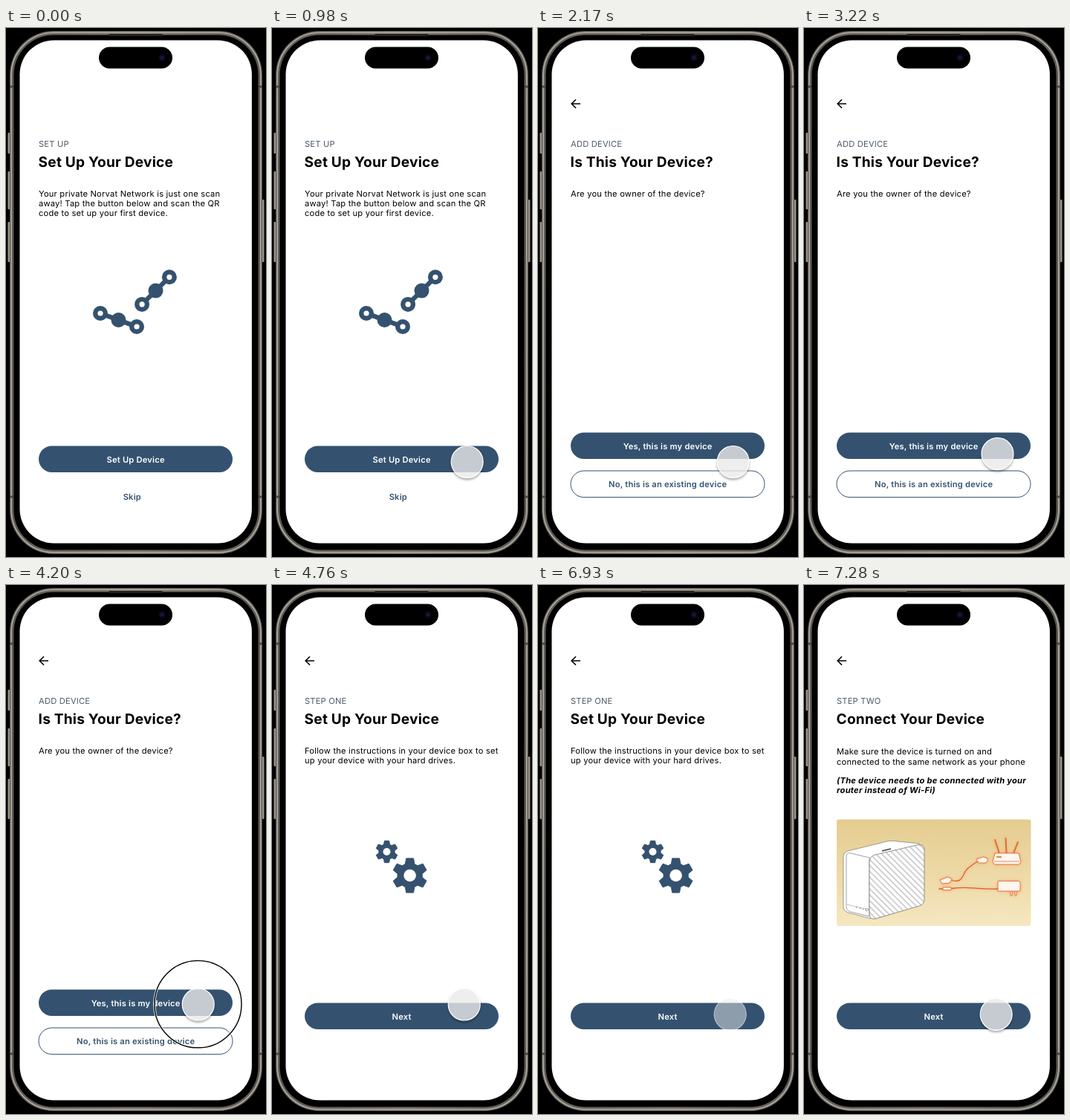
Write an HTML page that moves like this. It is 350 px wide and 712 px high and loops after 8000 ms.

```html
<!DOCTYPE html>
<html lang="en">
<head>
<meta charset="utf-8">
<title>Device setup</title>
<style>
  html, body { margin: 0; width: 100%; height: 100%; overflow: hidden; background: #000; }
  svg { display: block; width: 350px; height: 712px; }
  text {
    font: 400 11.15px Inter, sans-serif; font-optical-sizing: none; text-rendering: geometricPrecision;
    letter-spacing: .21px; fill: #000; white-space: pre;
  }
  .label { fill: #4b5967; }
  .title { font-size: 19.1px; font-weight: 700; }
  .button { font-weight: 600; text-anchor: middle; fill: #fff; }
  .plain { fill: #34526f; }
  .note { font-weight: 700; font-style: italic; letter-spacing: .26px; }
  .blue { fill: #34526f; }
  .link { stroke: #34526f; stroke-width: 6.2; }
  .sketch { fill: #fff; stroke: #777; stroke-width: .7; stroke-linejoin: round; }
  .wire { fill: none; stroke: #d0622f; stroke-width: 1.3; stroke-linecap: round; }
  .antenna { fill: none; stroke: #d9703c; stroke-width: 2; stroke-linecap: round; }
  .part { fill: #fff6ee; stroke: #d9703c; stroke-width: .9; stroke-linejoin: round; }
</style>
</head>
<body>
<svg viewBox="0 0 350 712" xmlns="http://www.w3.org/2000/svg">
  <defs>
    <clipPath id="screen"><rect x="18.5" y="16.4" width="312.4" height="677" rx="46"/></clipPath>
    <linearGradient id="metal" x2="1" y2="0">
      <stop offset="0" stop-color="#5d5a54"/><stop offset=".5" stop-color="#77736b"/><stop offset="1" stop-color="#5d5a54"/>
    </linearGradient>
    <linearGradient id="sand" x2="0" y2="1">
      <stop offset="0" stop-color="#e5cc90"/><stop offset=".5" stop-color="#edd9a6"/><stop offset="1" stop-color="#f5e7c1"/>
    </linearGradient>
    <pattern id="hatch" width="5.6" height="5.6" patternUnits="userSpaceOnUse" patternTransform="rotate(45)">
      <rect width="5.6" height="5.6" fill="#fff"/><path d="M0 2.8H5.6" stroke="#8c8c8c" stroke-width=".8"/>
    </pattern>
    <filter id="glow" x="-30%" y="-30%" width="160%" height="160%">
      <feDropShadow dx="0" dy="0" stdDeviation="2.2" flood-color="#ff8a4a" flood-opacity=".75"/>
    </filter>
    <filter id="shade" x="-30%" y="-30%" width="160%" height="160%">
      <feGaussianBlur stdDeviation="1.8"/>
    </filter>
    <mask id="outside">
      <rect x="-40" y="-40" width="80" height="80" fill="#fff"/><circle r="21.5"/>
    </mask>
  </defs>

  <!-- phone -->
  <g fill="#989287">
    <rect x="2.5" y="141" width="4" height="28" rx="1"/>
    <rect x="2.5" y="193" width="4" height="51" rx="1"/>
    <rect x="2.5" y="261" width="4" height="54" rx="1"/>
    <rect x="343.5" y="231" width="4" height="84" rx="1"/>
  </g>
  <rect x="5" y="4" width="340" height="704" rx="59" fill="url(#metal)"/>
  <rect x="7.2" y="6.2" width="335.6" height="699.6" rx="57" fill="none" stroke="#b1ada3" stroke-width="1.6"/>
  <path d="M5 79h6M339 79h6M5 631h6M339 631h6" stroke="#4a4742" stroke-width="3"/>
  <rect x="10.5" y="9.5" width="329" height="693" rx="53.5"/>
  <rect x="138" y="8" width="73" height="3" rx="1.5" fill="#24221f"/>
  <rect x="18.5" y="16.4" width="312.4" height="677" rx="46" fill="#fff"/>

  <g id="pages" clip-path="url(#screen)"></g>

  <rect x="125" y="25.5" width="99" height="29" rx="14.5"/>
  <circle cx="210" cy="40" r="4.6" fill="#0a0c1c"/>
  <circle cx="210" cy="40" r="2.2" fill="#15194a"/>

  <g id="ring" fill="none">
    <circle r="58.6" stroke="#fff" stroke-width="3.4" stroke-opacity=".8"/>
    <circle r="58.6" stroke="#000" stroke-width="1.4"/>
  </g>
  <g id="cursor">
    <g id="shadow" mask="url(#outside)"><circle cy="2.4" r="22" fill-opacity=".32" filter="url(#shade)"/></g>
    <circle r="21.5" fill="#eaeaea" fill-opacity=".8" stroke="#fff" stroke-width="1.2"/>
  </g>
</svg>
<script>
const $ = id => document.getElementById(id);
const SCREEN_WIDTH = 313, LOOP = 8000, STEP = 70;

const text = (x, y, words, kind = "") => `<text x="${x}" y="${y}" class="${kind}">${words}</text>`;
const lines = (y, gap, rows, kind) => rows.map((row, i) => text(44, y + i * gap, row, kind)).join("");
const heading = (label, title) => text(44, 160.3, label, "label") + text(43.6, 187.3, title, "title");
const button = (y, words, outlined) =>
  `<rect x="44" y="${y}" width="261" height="35.6" rx="17.8" ` +
  (outlined ? `fill="#fff" stroke="#34526f"/>` : `class="blue"/>`) +
  text(174.6, y + 22.3, words, outlined ? "button plain" : "button");
const back = `<path d="M57 102H45.4M51 96.3L45.2 102L51 107.7" fill="none" stroke="#000" stroke-width="1.6"/>`;

const node = (x, y, hollow) =>
  `<circle cx="${x}" cy="${y}" r="10" class="blue"/>` +
  (hollow ? `<circle cx="${x}" cy="${y}" r="3.6" fill="#fff"/>` : "");
const chain = (x, y, dx, dy) =>
  `<path class="link" d="M${x - dx} ${y - dy}L${x + dx} ${y + dy}"/>` +
  node(x - dx, y - dy, true) + node(x, y) + node(x + dx, y + dy, true);

function gear(cx, cy, radius, hole) {
  const points = [];
  for (let tooth = 0; tooth < 6; tooth++) {
    for (const [angle, reach] of [[-22, .71], [-12, 1], [12, 1], [22, .71]]) {
      const a = (tooth * 60 + 30 + angle) * Math.PI / 180;
      points.push([cx + Math.cos(a) * radius * reach, cy + Math.sin(a) * radius * reach]);
    }
  }
  return `<polygon points="${points}" class="blue" stroke="#34526f" stroke-linejoin="round"/>` +
    `<circle cx="${cx}" cy="${cy}" r="${hole}" fill="#fff"/>`;
}

const storageBox = `
  <path class="sketch" d="M53 367Q53 360 59 358L112 345Q117 344 121 344.500L155 348L90 449L60 441Q53 439 53 433Z"/>
  <path class="sketch" d="M57 364Q58 360 63 361L88 367V446L63 440Q57 438 57 433Z"/>
  <path d="M58 430L88 437" stroke="#999" stroke-width=".6"/>
  <path d="M105 358L117 355" stroke="#444" stroke-width="1.6"/>
  <path d="M70 434h1.2M75 435.2h1.2M79 436.2h1.2" stroke="#555"/>
  <ellipse cx="84.5" cy="437" rx="2" ry="1.4" class="sketch"/>
  <path d="M88 373Q88 365 96 363L152 350Q162 348 162 357V423Q162 430 155 432L97 449Q88 451 88 443Z"
    fill="url(#hatch)" stroke="#777" stroke-width=".8"/>`;

const cables = `<g filter="url(#glow)">
  <path class="wire" d="M197 397C216 403 212 388 221 381S230 374 237 371M199 408.500C222 405 232 410 261 409M182 409h6"/>
  <path class="antenna" d="M257 343L263 361M271.500 341L272.500 361M288 346L282 361"/>
  <path class="part" d="M183 397L194 393L199 396L196 401L186 402ZM232 369L242 366L248 369L245 374L235 374ZM187 407h11v3.500h-11Z"/>
  <path class="part" d="M257 361H289L292 373L289 376H257L254 373Z"/>
  <path class="part" d="M262 398.500H289Q291 398.500 291 401V412H261V400Q261 398.500 262 398.500ZM278 412v6h2v-6M284 412v6h2v-6"/>
  <path d="M256 372H290" stroke="#d9703c" stroke-width=".8"/>
  <path d="M259 366h7" stroke="#c9a44d" stroke-width="2.500"/>
</g>`;

const pages = [
  heading("SET UP", "Set Up Your Device") +
    lines(227.2, 12.7, ["Your private Norvat Network is just one scan",
      "away! Tap the button below and scan the QR", "code to set up your first device."]) +
    chain(151.5, 393, 24.5, 9) + chain(201.5, 353.6, 18.4, -18.3) +
    button(562.4, "Set Up Device") + text(169.8, 634.8, "Skip", "button plain"),

  back + heading("ADD DEVICE", "Is This Your Device?") +
    text(44, 227.2, "Are you the owner of the device?") +
    button(544.4, "Yes, this is my device") + button(596, "No, this is an existing device", true),

  back + heading("STEP ONE", "Set Up Your Device") +
    lines(227.2, 12.7, ["Follow the instructions in your device box to set",
      "up your device with your hard drives."]) +
    gear(154.5, 359, 15, 5) + gear(185.6, 391, 23.6, 8.3) + button(562.4, "Next"),

  back + heading("STEP TWO", "Connect Your Device") +
    lines(228.2, 13.3, ["Make sure the device is turned on and", "connected to the same network as your phone"]) +
    lines(266.5, 13, ["(The device needs to be connected with your", "router instead of Wi-Fi)"], "note") +
    `<rect x="44" y="315.5" width="261.5" height="143.5" rx="3" fill="url(#sand)"/>` +
    storageBox + cables + button(562.4, "Next")
];
$("pages").innerHTML = `<g id="strip">${pages.map((page, i) =>
  `<g transform="translate(${i * SCREEN_WIDTH})">${page}</g>`).join("")}</g>`;

// Ease-out progress from 0 to 1
const ramp = (t, start, duration) => {
  const p = Math.min(1, Math.max(0, (t - start) / duration));
  return 1 - (1 - p) ** 2;
};
const within = (t, spans) => spans.some(([from, to]) => t >= from && t < to);

const slides = [1820, 4410, 6930];
const rings = [[1680, 1820], [4200, 4410], [6790, 6930]];
const presses = [[1680, 1890], [4270, 4480], [6510, 7000]];
const moves = [[560, 420, -137, -36], [3080, 420, -4, -19.5], [6090, 280, 0, 13.3]];

function draw(now) {
  const t = Math.floor(now % LOOP / STEP) * STEP;
  const page = slides.reduce((sum, start) => sum + ramp(t, start, 350), 0);
  $("strip").setAttribute("transform", `translate(${-page * SCREEN_WIDTH})`);

  let x = 400, y = 620;
  for (const [start, duration, dx, dy] of moves) {
    const p = ramp(t, start, duration);
    x += dx * p;
    y += dy * p;
  }
  const pressed = within(t, presses);
  $("cursor").setAttribute("transform", `translate(${x - .3} ${y})`);
  $("cursor").setAttribute("opacity", pressed ? .625 : 1);
  $("shadow").setAttribute("opacity", pressed ? 0 : 1);
  $("ring").setAttribute("transform", `translate(${x - .6} ${y - .3})`);
  $("ring").setAttribute("visibility", within(t, rings) ? "visible" : "hidden");
  requestAnimationFrame(() => draw(performance.now()));
}
draw(performance.now());
</script>
</body>
</html>
```
